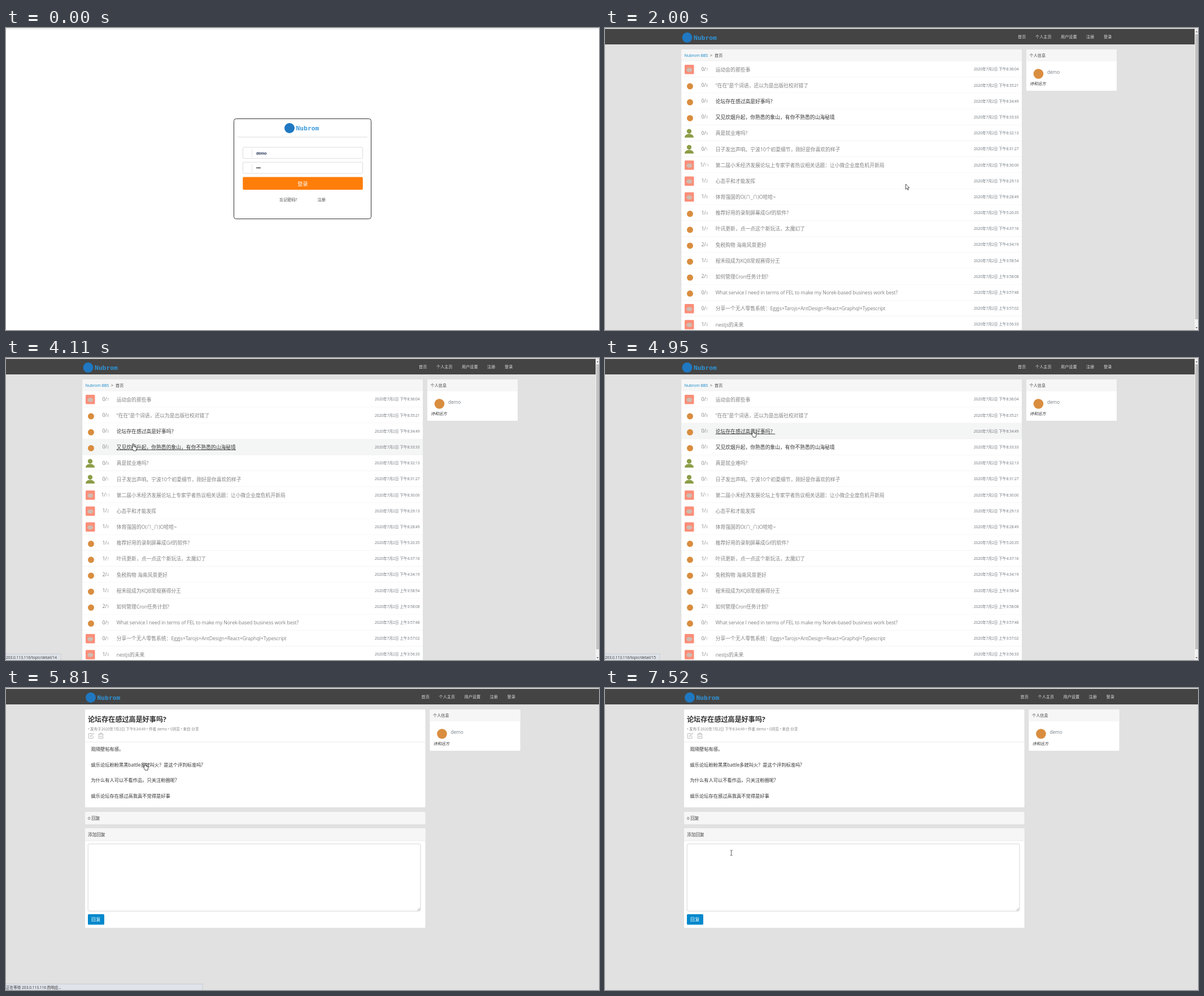
An HTML page for the animation above (8 s loop, 1050 by 534 pixels).

```html
<!DOCTYPE html>
<html lang="zh-CN">
<head>
<meta charset="utf-8">
<title>BBS</title>
<style>
  html, body { margin: 0; width: 100%; height: 100%; overflow: hidden; background: #fff; }
  svg { display: block; width: 100%; height: 100%; }
  text { font-family: "Open Sans", "Noto Sans CJK SC", "Noto Sans CJK", sans-serif; white-space: pre; }
  .latin { letter-spacing: -.015em; }
  .brand text { font: bold 11.3px "DejaVu Sans Mono", monospace; }
  .brand .latin { letter-spacing: 0; }
  .field { font: bold 7.15px "Liberation Sans", sans-serif; }
</style>
</head>
<body>
<svg id="stage" viewBox="0 0 1050 534" preserveAspectRatio="none"></svg>
<script>
const LOOP = 8000;
const HOST = '203.0.113.116';
const USER = 'demo';
const ROW_TOP = 59, ROW_H = 28.19;

// avatar kind | replies/views | title | time
const topics = `p|0/7|运动会的那些事|下午8:36:04
o|0/8|“在在”是个词语，还以为是出版社校对错了|下午8:35:21
o|0/0|论坛存在感过高是好事吗？|下午8:34:49
o|0/0|又见炊烟升起，你熟悉的象山，有你不熟悉的山海秘境|下午8:33:33
g|0/9|真是就业难吗?|下午8:32:13
g|0/1|日子发出声响。宁波10个初夏细节，刚好是你喜欢的样子|下午8:31:27
p|1/11|第二届小禾经济发展论坛上专家学者热议相关话题：让小微企业度危机开新局|下午8:30:00
p|1/2|心态平和才能发挥|下午8:29:13
p|1/6|体育强国的O(∩_∩)O哈哈~|下午8:28:49
o|1/4|推荐好用的录制屏幕成Gif的软件?|下午5:20:35
o|1/7|叶讯更新，点一点这个新玩法，太魔幻了|下午4:37:16
o|2/4|免税购物 海南风景更好|下午4:34:19
o|1/2|程禾砚成为KQB常规赛得分王|上午3:58:54
o|2/5|如何管理Cron任务计划?|上午3:58:08
o|0/5|What service I need in terms of FEL to make my Norek-based business work best?|上午3:57:48
p|0/1|分享一个无人零售系统：Eggjs+Tarojs+AntDesign+React+Graphql+Typescript|上午3:57:02
p|1/3|nestjs的未来|上午3:56:33`.split('\n').map(line => line.split('|'));

// text with its vertical centre at y
const text = (x, y, size, str, fill, more = '') =>
  `<text x="${x}" y="${y + size * .37}" font-size="${size}" fill="${fill}" ${more}>` +
  str.replace(/[ -~]+/g, '<tspan class="latin">$&</tspan>') + '</text>';
const rect = (x, y, x2, y2, fill, more = '') =>
  `<rect x="${x}" y="${y}" width="${x2 - x}" height="${y2 - y}" fill="${fill}" ${more}/>`;
const circle = (x, y, r, fill) => `<circle cx="${x}" cy="${y}" r="${r}" fill="${fill}"/>`;
const path = (d, more) => `<path d="${d}" ${more}/>`;
const brand = (x, y, fill) =>
  `<g class="brand">${circle(x, y, 9, '#1f78c1')}${text(x + 11.5, y + .3, 11.3, 'Nubrom', fill)}</g>`;

const avatars = {
  p: y => rect(141, y - 8, 157.5, y + 8.5, '#fb8e79', 'rx="1.5"') +
    `<ellipse cx="149.3" cy="${y + 1}" rx="5" ry="3.8" fill="#cfbcb2"/>`,
  o: y => circle(150.5, y + 1.8, 5.5, '#d98d3f'),
  g: y => circle(149, y - 3.2, 4.2, '#8b9d47') +
    path(`M141 ${y + 8}q0-6 8-6.5q8 .5 8 6.5z`, 'fill="#8b9d47"')
};

function login() {
  return rect(0, 0, 1050, 534, '#fff') + rect(0, 1, 1050, 2, '#dcdcdc') +
    rect(403.5, 160.5, 646.5, 337.5, '#fff', 'rx="4" stroke="#333"') +
    brand(502, 177, '#3a9ad9') + rect(410, 192.4, 640, 193.4, '#ddd') +
    [210.9, 237.2].map(y => rect(419.4, y, 631.6, y + 19.8, '#fff', 'rx="1.5" stroke="#d8d8d8" stroke-width=".9"') +
      rect(435.3, y + 3, 436.1, y + 17, '#ddd')).join('') +
    text(443, 221, 7.15, USER, '#1c3150', 'class="field"') +
    [444.4, 447, 449.6].map(x => circle(x, 247.3, 1.1, '#222')).join('') +
    rect(419.3, 263.6, 631.8, 286, '#ff7d09', 'id="submit" rx="2"') +
    text(516, 275.3, 9.35, '登录', '#fff') +
    text(484, 303.5, 7.15, '忘记密码?', '#444') + text(551.5, 303.5, 7.15, '注册', '#444');
}

// header and sidebar shared by both forum pages
function chrome() {
  const nav = [[731, '首页'], [762, '个人主页'], [807, '用户设置'], [852, '注册'], [883, '登录']];
  return brand(145.5, 16.8, '#2f93d6') +
    nav.map(([x, s]) => text(x, 15.5, 7.15, s, '#ddd')).join('') +
    rect(746, 38, 906, 111, '#fff', 'rx="1.5"') + rect(746, 38, 906, 59, '#f6f6f6', 'rx="1.5"') +
    text(751.5, 48.5, 7.15, '个人信息', '#444') + circle(767.5, 81, 8.8, '#d98d3f') +
    text(783, 78.3, 8.4, USER, '#778087') +
    text(752, 98.5, 7.15, '诗和远方', '#333', 'font-style="italic"');
}

const backdrop = () => rect(0, 0, 1050, 534, '#e1e1e1') + rect(0, 0, 1050, 1.4, '#fff') +
  rect(0, 1.4, 1050, 29, '#444');

function topicRow([kind, count, title, time], i) {
  const top = ROW_TOP + i * ROW_H, y = top + ROW_H / 2;
  const [replies, views] = count.split('/');
  const fresh = i === 2 || i === 3;
  return rect(135.5, top, 738, top + ROW_H, '#fff', 'class="row"') +
    rect(135.5, top + ROW_H - .7, 738, top + ROW_H, '#efefef') + avatars[kind](y) +
    `<text x="176.5" y="${y + 2.8}" font-size="8.2" fill="#777" text-anchor="middle">${replies}/` +
    `<tspan font-size="6.8" fill="#aaa">${views}</tspan></text>` +
    text(195.7, y + .2, 8.8, title, fresh ? '#333' : '#828282', 'class="title"') +
    text(732.5, y - .2, 6.7, '2020年7月2日 ' + time, '#6c747a', 'text-anchor="end"');
}

function list() {
  return backdrop() + chrome() +
    rect(135.5, 38, 738, 534, '#fff', 'rx="1.5"') + rect(135.5, 38, 738, 59, '#f6f6f6', 'rx="1.5"') +
    text(140.5, 48.5, 7.15, 'Nubrom BBS', '#1286c8') + text(186, 48.5, 7.15, '>', '#444') +
    text(194, 48.5, 7.15, '首页', '#444') + topics.map(topicRow).join('') +
    rect(1044, 1.4, 1050, 534, '#f1f1f1') + rect(1045, 11, 1050, 515, '#c1c1c1') +
    path('M1045.7 7.5l1.7-2.2 1.7 2.2zM1045.7 529l1.7 2.2 1.7-2.2z', 'fill="#555"');
}

function detail() {
  const body = ['观隔壁帖有感。', '娱乐论坛粉粉黑黑battle多就叫火？是这个评判标准吗?',
    '为什么有人可以不看作品，只关注粉圈呢?', '娱乐论坛存在感过高我真不觉得是好事'];
  return backdrop() + `<g transform="translate(4.5 0)">${chrome()}</g>` +
    rect(140, 38, 742.5, 211, '#fff', 'rx="1.5"') +
    text(145, 55.3, 12.1, '论坛存在感过高是好事吗?', '#333', 'font-weight="700"') +
    text(145, 72.6, 6.6, `• 发布于2020年7月2日 下午8:34:49 • 作者 ${USER} • 0浏览 • 来自 分享`, '#838383') +
    path('M152 80.5h-5.5v8.5h7.5v-4M149.5 86l.5-2 4.5-4.5 1.2 1.2-4.5 4.5z' +
      'M163.5 81.5h9M166.5 81.5v-1.7h3v1.7M164.5 81.5v7.7h7v-7.7M167 84v3M169 84v3',
      'fill="none" stroke="#aaa" stroke-width=".8"') +
    rect(140, 95, 742.5, 95.8, '#e5e5e5') +
    body.map((s, i) => text(150.5, 108.2 + i * 27.5, 8.25, s, '#333')).join('') +
    rect(140, 219, 742.5, 241, '#f6f6f6', 'rx="1.5"') + text(145, 229.7, 7.7, '0 回复', '#444') +
    rect(140, 248, 742.5, 424, '#fff', 'rx="1.5"') + rect(140, 248, 742.5, 270, '#f6f6f6', 'rx="1.5"') +
    rect(140, 269.8, 742.5, 270.5, '#e5e5e5') + text(145, 259, 7.7, '添加回复', '#444') +
    rect(145.2, 275.7, 734, 394.5, '#fff', 'rx="2" stroke="#ccc" stroke-width=".8"') +
    path('M728.5 393.5l4.5-4.5M731 393.5l2-2', 'stroke="#777" stroke-width=".7"') +
    rect(145, 400, 174, 418.5, '#08c', 'rx="1.5"') +
    text(151, 409.2, 8, '回复', '#fff', 'letter-spacing=".6"') +
    rect(149.3, 283, 150.1, 293, '#222', 'id="caret"');
}

const cursors = {
  arrow: path('M0 0v9.2l2.1-2 1.4 3.3 1.4-.6-1.4-3.2h2.9z',
    'fill="#fff" stroke="#111" stroke-width=".7"'),
  hand: path('M-1 1q1-1.5 2 0v4l4 .8q1.2.4 1 1.7l-.8 4.5v1h-5v-1l-3.2-4q-.3-1.4 1-.9l1 1z',
    'fill="#fff" stroke="#111" stroke-width=".75"') +
    path('M2.6 5.5v2M4.3 5.8v2', 'stroke="#111" stroke-width=".5"'),
  beam: path('M-2-4.5h1.5l.5.5.5-.5h1.5M0-4v8M-2 4.5h1.5l.5-.5.5.5h1.5',
    'fill="none" stroke="#333" stroke-width=".8"')
};

const stage = document.getElementById('stage');
const group = (id, inner) => `<g id="${id}">${inner}</g>`;
stage.innerHTML = group('login', login()) + group('list', list()) + group('detail', detail()) +
  group('bar', rect(-1, 523.3, 97, 535, '#dfe3ea', 'stroke="#c4c7cc" stroke-width=".8"') +
    text(0, 529.2, 6.6, '', '#333')) +
  group('cursor', Object.entries(cursors).map(([id, d]) => group(id, d)).join(''));

const $ = id => document.getElementById(id);
const show = (el, on) => { el.style.display = on ? '' : 'none'; };
const rows = [...document.querySelectorAll('.row')];
const titles = [...document.querySelectorAll('.title')];
const [barBox, barText] = $('bar').children;

// pointer moves: start, end, number of steps, target x, y
const moves = [
  [150, 150, 1, 829, 467], [225, 525, 5, 517, 266], [600, 600, 1, 532.5, 276],
  [2460, 2690, 4, 600, 184], [2860, 3160, 5, 626, 160], [3330, 3790, 7, 221, 150.2],
  [4110, 4420, 5, 242, 154.5], [4720, 4950, 4, 262, 127], [5030, 5180, 3, 332, 141],
  [5410, 5410, 1, 252, 143], [5640, 5640, 1, 247, 133.5], [5720, 5720, 1, 246, 132.3],
  [5890, 6420, 7, 240, 262], [6500, 6650, 3, 223.7, 291.5]
];

function pointer(t) {
  let x = 829, y = 467;
  for (const [t0, t1, n, tx, ty] of moves) {
    if (t < t0) break;
    const p = n < 2 || t >= t1 ? 1 : (Math.floor((t - t0) / ((t1 - t0) / (n - 1)) + 1e-6) + 1) / n;
    x += (tx - x) * p;
    y += (ty - y) * p;
  }
  return [x, y];
}

const statuses = [
  [0, ''], [3560, HOST + '/topic/detail/14'], [4873, HOST + '/topic/detail/15'],
  [5810, `正在等待 ${HOST} 的响应...`], [6155, '']
];

function render(t) {
  const page = t < 2000 ? 'login' : t < 5810 ? 'list' : 'detail';
  for (const id of ['login', 'list', 'detail']) show($(id), id === page);

  const [x, y] = pointer(t);
  let kind = page === 'detail' ? (t < 5890 ? 'hand' : y > 275 ? 'beam' : 'arrow') : 'arrow';

  if (page === 'list') {
    const over = t < 2460 ? -1 : Math.floor((y - ROW_TOP) / ROW_H);
    rows.forEach((row, i) => {
      const mid = ROW_TOP + (i + .5) * ROW_H;
      const linked = i === over && Math.abs(y - mid) < 8 &&
        x > 195 && x < 196 + titles[i].getComputedTextLength();
      row.setAttribute('fill', i === over ? '#f4f5f5' : '#fff');
      titles[i].setAttribute('text-decoration', linked ? 'underline' : 'none');
      if (linked) kind = 'hand';
    });
  }

  const submit = $('submit');
  submit.setAttribute('fill', t < 1680 ? '#ff7d09' : t < 1770 ? '#f87806' : '#f07304');
  submit.setAttribute('stroke', t < 1680 ? 'none' : '#151515');
  submit.setAttribute('stroke-width', 1.3);

  show($('caret'), t >= 6960 && t < 7520);

  const status = statuses.filter(s => s[0] <= t).pop()[1];
  show($('bar'), status);
  barText.textContent = status;
  barBox.setAttribute('width', page === 'detail' ? 349 : 98);

  show($('cursor'), t >= 150);
  $('cursor').setAttribute('transform', `translate(${x} ${y})`);
  for (const id in cursors) show($(id), id === kind);
}

const start = performance.now();
function tick() {
  render((performance.now() - start) % LOOP);
  requestAnimationFrame(tick);
}
tick();
</script>
</body>
</html>
```
